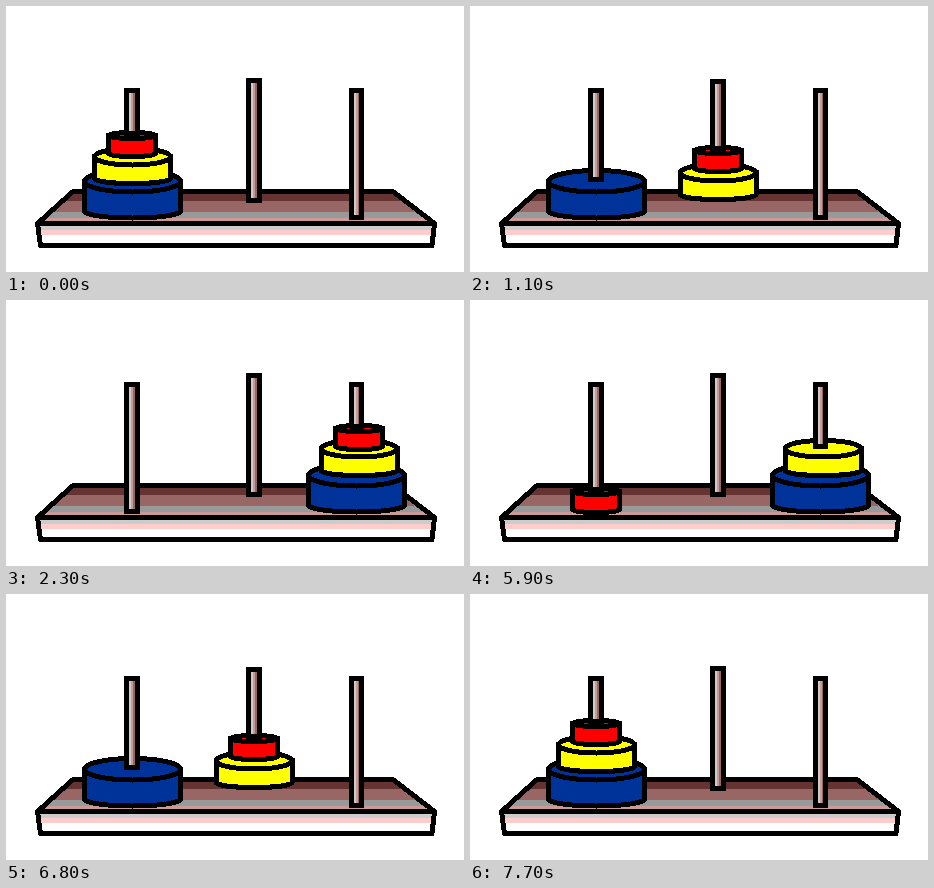
An HTML page for the animation above (8000 ms loop, 458 by 266 pixels).

```html
<!DOCTYPE html>
<html lang="en">
<head>
<meta charset="utf-8">
<title>Towers of Hanoi</title>
<style>
html, body { margin: 0; width: 100%; height: 100%; overflow: hidden; background: #fff; }
svg { display: block; width: 458px; height: 266px; }
</style>
</head>
<body>
<svg viewBox="0 0 458 266" shape-rendering="crispEdges">
  <defs>
    <clipPath id="deck"><path d="M67 185H387L428 217H31Z"/></clipPath>
    <clipPath id="front"><path d="M31 217H429L426 240H34Z"/></clipPath>
  </defs>
  <g clip-path="url(#deck)">
    <path fill="#633" d="M30 185H430V195H30Z"/>
    <path fill="#966" d="M30 195H430V206H30Z"/>
    <path fill="#999" d="M30 206H430V212H30Z"/>
    <path fill="#c99" d="M30 212H430V218H30Z"/>
  </g>
  <g clip-path="url(#front)">
    <path fill="#ccc" d="M30 217H430V224H30Z"/>
    <path fill="#fcc" d="M30 224H430V229H30Z"/>
    <path fill="#fff" d="M30 229H430V241H30Z"/>
  </g>
  <g fill="none" stroke="#000" stroke-width="5" stroke-linejoin="round">
    <path d="M31.5 217.5L67 185.5H387L428.5 217.5"/>
    <path d="M31.5 217.5H428.5L426 239.5H34.5Z"/>
  </g>
  <g id="scene"></g>
</svg>
<script>
const LOOP = 8000, STEP = 300;
const scene = document.getElementById('scene');

// Peg of blue, yellow and red after each move
const STATES = ['000', '002', '012', '011', '211', '210', '220', '222'];

const PEGS = [
  { x: 118, w: 16, top: 82, foot: 214 },
  { x: 240, w: 16, top: 73, foot: 197 },
  { x: 343, w: 15, top: 82, foot: 214 }
];

const BLUE = { rx: 48, ry: 10.75, h: 36.75, bulge: 7, fill: '#039' };
const YELLOW = { rx: 38, ry: 8.25, h: 26.75, bulge: 5, fill: '#ff0' };
const RED = { rx: 23.5, ry: 3, h: 21, bulge: 3, fill: '#f00' };

// Centre of each disc's top face, per peg
const BLUE_AT = [[126.5, 175.25], null, [350.5, 175.25]];
const YELLOW_AT = [[126.5, 150.75], [248, 166.75], [353, 148.75]];
const RED_AT = [[126, 129.5], [248, 144.5], [353, 128.5]];
const RED_LOW = [[126, 191.5], null, [351, 191.5]];

const rect = (x, y, w, h, fill) =>
  `<rect x="${x}" y="${y}" width="${w}" height="${h}" fill="${fill}"/>`;

function peg(x, w, top, foot) {
  const h = foot - top - 10;
  return rect(x, top, w, foot - top, '#000') +
    rect(x + 5, top + 5, 2, h, '#ccc') +
    rect(x + 7, top + 5, 2, h, '#c99') +
    rect(x + 9, top + 5, w - 14, h, '#966');
}

function disc({ rx, ry, h, bulge, fill }, [cx, cy]) {
  const l = cx - rx, r = cx + rx, side = cy + h - bulge;
  return `<g fill="${fill}" stroke="#000" stroke-width="5">` +
    `<path d="M${l} ${cy}V${side}A${rx} ${bulge} 0 0 0 ${r} ${side}V${cy}Z"/>` +
    `<ellipse cx="${cx}" cy="${cy}" rx="${rx}" ry="${ry}"/></g>`;
}

function tower(i, step) {
  const [blue, yellow, red] = [...STATES[step]].map(p => +p === i);
  let { x, w, top, foot } = PEGS[i];
  if (i === 1 && step < 3) top--;
  let discs = '';
  const add = (shape, at) => {
    discs += disc(shape, at);
    foot = Math.floor(at[1] + 0.75);
  };
  if (blue) add(BLUE, BLUE_AT[i]);
  if (yellow) add(YELLOW, YELLOW_AT[i]);
  if (red) add(RED, (yellow ? RED_AT : RED_LOW)[i]);
  return discs + peg(x, w, top, foot);
}

function stepAt(t) {
  return t < 5900
    ? Math.max(0, Math.min(7, Math.floor((t - 200) / STEP)))
    : 6 - Math.floor((t - 5900) / STEP);
}

let shown = -1;
function draw(t) {
  const step = stepAt(t);
  if (step === shown) return;
  shown = step;
  scene.innerHTML = PEGS.map((_, i) => tower(i, step)).join('');
}

const start = performance.now();
function tick() {
  draw((performance.now() - start) % LOOP);
  requestAnimationFrame(tick);
}
tick();
</script>
</body>
</html>
```
